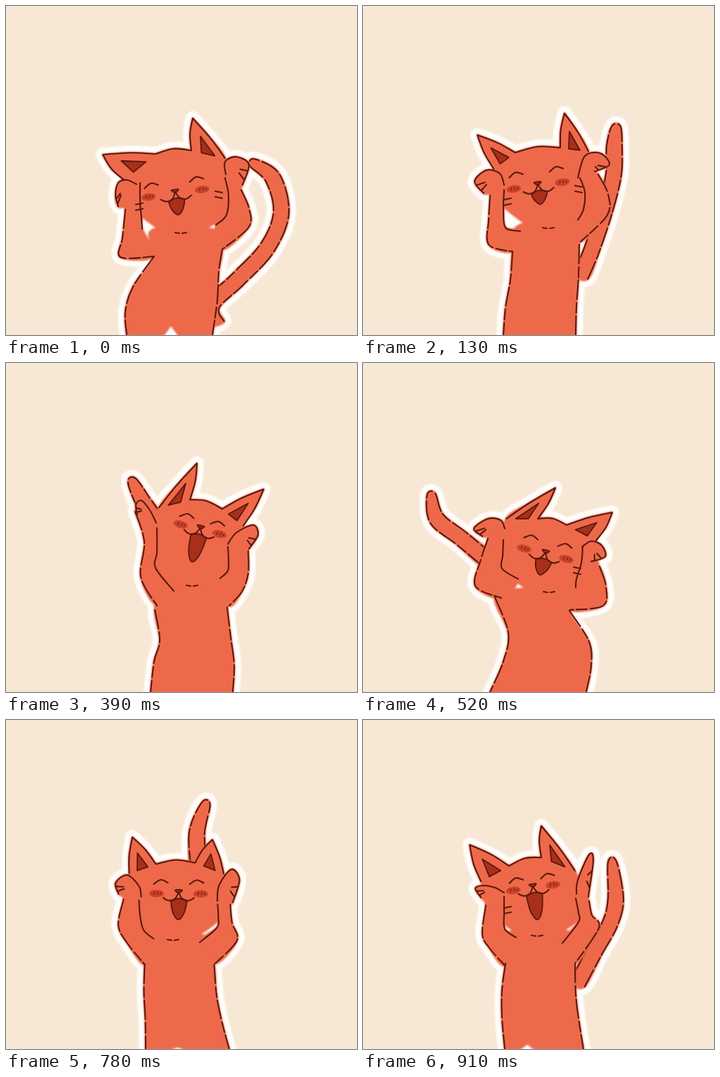
These frames come from a looping animation (500 px wide and 469 px high, 1.04 s). An HTML page:

```html
<!DOCTYPE html>
<html lang="en">
<head>
<meta charset="utf-8">
<title>Dancing cat</title>
<style>
html, body { margin: 0; width: 100%; height: 100%; overflow: hidden; background: #f7e8d5; }
svg { display: block; width: 100%; height: 100%; }
path { stroke-linecap: round; stroke-linejoin: round; }
.ink { fill: none; stroke: #581a10; stroke-width: 2.1; }
.fur { fill: #ee694a; stroke: #ee694a; stroke-width: 3; }
.rough { stroke-dasharray: 27 5 15 4; }
</style>
</head>
<body>
<svg viewBox="0 0 500 469">
  <defs>
    <filter id="soft" x="-5%" y="-5%" width="110%" height="110%"><feGaussianBlur stdDeviation="1.1"/></filter>
  </defs>
  <path id="halo" fill="#fffdfa" stroke="#fffdfa" stroke-width="20" filter="url(#soft)"/>
  <path id="tailFur" class="fur" filter="url(#soft)"/>
  <path id="tailInk" class="ink rough"/>
  <path id="fur" class="fur" filter="url(#soft)"/>
  <g id="cheeks" fill="#c9422a"></g>
  <path id="dark" fill="#a92f1a" stroke="#581a10" stroke-width="1.8"/>
  <path id="ink" class="ink"/>
  <path id="rough" class="ink rough"/>
</svg>
<script>
const STEP = 130;
const $ = id => document.getElementById(id);

// ear: base, tip, base. face: nose x, y, tilt, eye gap, eye rise, mouth depth.
// arm: inner edge, paw, outer edge. body: left and right edge, gap at the foot.
const sway = {
  ears: [[168,248, 138,212, 213,211], [264,206, 266,160, 312,217]],
  face: [241, 265, -8, 65, 15, 33],
  chin: [249, 324],
  armL: [[191,252, 191,280, 193,303, 194,318], [186,254, 172,248, 160,252, 156,270, 160,286], [170,290, 166,330, 163,358, 210,357]],
  armR: [[312,245, 317,270, 314,298, 299,312], [313,240, 312,222, 328,215, 346,226, 337,255], [335,262, 346,288, 346,315, 308,347]],
  body: [[211,357, 181,400, 170,435, 172,469], [308,347, 303,380, 301,420, 294,469], [235,454]],
  tail: [300,452, 294,425, 330,390, 372,345, 392,295, 380,245, 351,223],
  whiskers: [190,281, 303,266]
};
const reach = {
  ears: [[186,232, 163,184, 217,209], [281,202, 287,153, 321,207]],
  face: [249, 254, -8, 58, 19, 29],
  chin: [264, 317],
  armL: [[201,262, 200,290, 203,316, 224,321], [201,255, 195,239, 176,234, 159,250, 172,267], [181,270, 179,305, 179,340, 212,350]],
  armR: [[309,245, 316,265, 314,290, 306,305], [306,245, 316,214, 338,210, 351,226, 330,236], [335,240, 349,268, 348,298, 310,336]],
  body: [[213,350, 210,390, 203,430, 200,469], [308,340, 307,385, 304,430, 303,469], [255,469]],
  tail: [310,385, 325,350, 345,290, 357,240, 358,200, 361,171],
  whiskers: [206,274, 307,258]
};
const cheer = {
  ears: [[218,206, 272,143, 262,195], [308,208, 367,180, 338,232]],
  face: [277, 235, 14, 45, 13, 50],
  chin: [265, 318],
  armL: [[215,235, 215,270, 213,292, 239,325], [214,228, 205,210, 193,196, 185,202, 187,216], [184,212, 197,255, 192,305, 215,346]],
  armR: [[316,262, 317,280, 316,296, 305,307], [316,258, 328,242, 352,231, 359,245, 346,265], [345,268, 345,300, 336,326, 318,346]],
  body: [[212,352, 219,395, 211,425, 206,469], [315,348, 320,390, 325,430, 323,469], [255,469]],
  tail: [214,225, 196,199, 179,167],
  whiskers: []
};
const lean = {
  ears: [[204,222, 274,178, 249,222], [290,231, 355,213, 332,253]],
  face: [260, 270, 14, 50, 17, 33],
  chin: [265, 327],
  armL: [[200,252, 199,275, 198,293, 221,308], [202,236, 196,224, 178,222, 158,236, 170,247], [178,250, 168,280, 160,318, 197,335]],
  armR: [[313,262, 311,285, 304,308, 303,320], [312,262, 325,254, 340,260, 345,276, 325,283], [337,290, 346,318, 342,346, 295,352]],
  body: [[188,334, 207,385, 200,425, 181,469], [294,353, 322,397, 325,432, 318,469], [255,469]],
  tail: [182,285, 140,250, 105,222, 97,187],
  whiskers: [305,293]
};
const hop = {
  ears: [[183,207, 208,156, 219,203], [285,211, 334,190, 318,223]],
  face: [250, 254, 9, 57, 18, 30],
  chin: [228, 320],
  armL: [[178,262, 181,282, 190,301, 203,314], [184,258, 191,235, 173,206, 152,225, 153,243], [160,247, 150,280, 166,312, 194,348]],
  armR: [[300,272, 298,290, 294,304, 268,316], [298,268, 301,243, 320,234, 337,256, 325,268], [317,268, 318,300, 322,333, 292,349]],
  body: [[192,350, 195,390, 199,430, 196,469], [291,350, 297,395, 308,435, 322,469], [255,469]],
  tail: [184,210, 174,185, 175,150, 196,117],
  whiskers: [194,258, 295,270]
};
const laugh = {
  ears: [[168,230, 152,178, 208,208], [254,196, 254,151, 302,215]],
  face: [242, 237, -8, 45, 13, 48],
  chin: [248, 308],
  armL: [[201,252, 201,275, 202,298, 218,310], [201,246, 188,239, 172,236, 160,240, 168,253], [175,264, 170,305, 180,325, 202,350]],
  armR: [[303,254, 307,275, 307,288, 284,318], [304,248, 306,228, 322,192, 328,200, 321,252], [322,258, 326,278, 336,296, 303,346]],
  body: [[203,347, 198,385, 198,425, 202,469], [302,347, 303,390, 307,425, 314,469], [234,461]],
  tail: [306,375, 330,330, 352,290, 360,255, 355,202],
  whiskers: [206,266]
};

const mean = (a, b) => Array.isArray(a) ? a.map((v, i) => mean(v, b[i])) : (a + b) / 2;

function between(a, b, tail) {
  const pose = { tail, whiskers: [] };
  for (const key of ['ears', 'face', 'chin', 'armL', 'armR', 'body']) pose[key] = mean(a[key], b[key]);
  return pose;
}

const poses = [
  sway, reach, between(reach, cheer, [262,215, 262,150, 268,99]), cheer,
  lean, hop, between(hop, laugh, [275,215, 272,160, 285,119]), laugh
];

// Points are [x, y] or [x, y, 1] for a sharp corner
const pairs = flat => flat.flatMap((v, i) => i % 2 ? [] : [[v, flat[i + 1]]]);
const mix = (a, b, t) => [a[0] + (b[0] - a[0]) * t, a[1] + (b[1] - a[1]) * t];
const add = (p, x, y) => [p[0] + x, p[1] + y];
const sharp = p => [p[0], p[1], 1];

// Smooth curve through points
function curve(pts, closed) {
  const n = pts.length;
  const at = i => closed ? pts[(i + n) % n] : pts[Math.max(0, Math.min(n - 1, i))];
  const slope = i => at(i)[2] ? [0, 0] : mix(at(i - 1), at(i + 1), 1).map((v, k) => (v - at(i - 1)[k]) / 6);
  let d = `M${pts[0][0]} ${pts[0][1]}`;
  for (let i = 0; i < (closed ? n : n - 1); i++) {
    const p = at(i), q = at(i + 1), u = slope(i), v = slope(i + 1);
    d += `C${p[0] + u[0]} ${p[1] + u[1]} ${q[0] - v[0]} ${q[1] - v[1]} ${q[0]} ${q[1]}`;
  }
  return closed ? d + 'Z' : d;
}

// Closed shape with a fixed winding, so that overlaps stay filled
function blob(pts) {
  const area = pts.reduce((sum, p, i) => {
    const q = pts[(i + 1) % pts.length];
    return sum + p[0] * q[1] - q[0] * p[1];
  }, 0);
  return curve(area < 0 ? [...pts].reverse() : pts, true);
}

function ear(flat) {
  const [a, tip, b] = pairs(flat);
  const mid = mix(a, b, 0.5);
  const bulge = p => add(mix(p, tip, 0.5), (p[0] - mid[0]) * 0.12, (p[1] - mid[1]) * 0.12);
  const inner = [mix(mid, tip, 0.5), mix(mid, a, 0.4), mix(mid, b, 0.4)].map(sharp);
  return { a, b, edge: [a, bulge(a), sharp(tip), bulge(b), b], inner: curve(inner, true) };
}

function arm(parts) {
  const [inner, paw, outer] = parts.map(pairs);
  const mid = paw.reduce((m, p) => add(m, p[0] / paw.length, p[1] / paw.length), [0, 0]);
  const fingers = [0.3, 0.75].map(t => {
    const p = mix(paw[3], paw[4], t);
    return curve([p, mix(p, mid, 0.6)]);
  });
  return {
    fur: blob([...[...inner].reverse(), ...paw, ...outer]),
    ink: curve(inner) + curve(paw) + fingers.join(''),
    rough: curve(outer)
  };
}

function tailEdge(flat) {
  const pts = pairs(flat), last = pts.length - 1;
  const side = sign => pts.map((p, i) => {
    const a = pts[Math.max(0, i - 1)], b = pts[Math.min(last, i + 1)];
    const dx = b[0] - a[0], dy = b[1] - a[1];
    const w = sign * (i === last ? 6 : 11) / Math.hypot(dx, dy);
    return add(p, -dy * w, dx * w);
  });
  return [...side(1), ...side(-1).reverse()];
}

function face([x, y, tilt, gap, rise, depth]) {
  const r = tilt * Math.PI / 180, c = Math.cos(r), s = Math.sin(r);
  const at = (u, v) => [x + u * c - v * s, y + u * s + v * c];
  const eye = u => curve([at(u - 10, 4 - rise), at(u, -2 - rise), at(u + 10, 2 - rise)]);
  const lip = k => curve([at(22 * k, 8), at(14 * k, 12), at(5 * k, 9), at(0, 0)]);
  const cheek = k => {
    const [px, py] = at(k * (gap / 2 + 6), 2);
    return `<g transform="translate(${px} ${py}) rotate(${tilt})"><ellipse rx="10.5" ry="5.3"/>` +
      '<path d="M-4 1l1-3M1 1l1-3M5 1l1-2" stroke="#7d2113" stroke-width="1.4"/></g>';
  };
  const mouth = [sharp(at(-11, 13)), at(0, 9), sharp(at(12, 12)), at(8, depth * 0.75), at(0, depth), at(-8, depth * 0.75)];
  return {
    ink: eye(-gap / 2) + eye(gap / 2) + lip(-1) + lip(1),
    dark: curve(mouth, true) + curve([at(-5, -3), at(0, 1), at(5, -3)], true),
    cheeks: cheek(-1) + cheek(1)
  };
}

function build(p) {
  const [left, right] = p.ears.map(ear);
  const arms = [arm(p.armL), arm(p.armR)];
  const look = face(p.face);
  const { chin } = p;
  const top = add(mix(left.b, right.a, 0.5), 0, -5);
  const jawL = add(chin, -60, -28), jawR = add(chin, 64, -28);
  const head = blob([
    ...left.edge.slice(0, 4), sharp(left.b), top, sharp(right.a), ...right.edge.slice(1),
    add(mix(right.b, jawR, 0.5), 3, 0), jawR, add(chin, 0, 5), jawL, add(mix(left.a, jawL, 0.5), -3, 0)
  ]);

  const [sideL, sideR] = p.body.slice(0, 2).map(pairs);
  const foot = p.body[2];
  const notch = [[foot[0] - 11, 469], foot, [foot[0] + 11, 469]].map(sharp);
  const body = blob([
    add(chin, -40, -5), ...sideL.slice(0, 3), sharp(sideL[3]), ...notch,
    sharp(sideR[3]), ...sideR.slice(0, 3).reverse(), add(chin, 48, -5)
  ]);

  const whiskers = pairs(p.whiskers).map(([x, y]) => {
    const k = x < p.face[0] ? -1 : 1;
    return [0, 8].map(d => curve([[x - 5, y + d - 2 * k], [x + 5, y + d]])).join('');
  });
  const chinInk = curve([add(chin, -8, -1), add(chin, -2, 0)]) + curve([add(chin, 2, 0), add(chin, 8, -1)]);
  const edge = tailEdge(p.tail);
  const fur = head + body + arms[0].fur + arms[1].fur;
  const tailFur = blob(edge);
  return {
    halo: fur + tailFur, tailFur, fur,
    tailInk: curve(edge),
    dark: left.inner + right.inner + look.dark,
    ink: curve(left.edge) + curve(right.edge) + curve([left.b, top, right.a]) +
      look.ink + chinInk + whiskers.join('') + arms[0].ink + arms[1].ink,
    rough: curve(sideL) + curve(sideR) + arms[0].rough + arms[1].rough,
    cheeks: look.cheeks
  };
}

const drawn = poses.map(build);
let shown = -1;
function show(i) {
  if (i === shown) return;
  shown = i;
  const { cheeks, ...paths } = drawn[i];
  for (const id in paths) $(id).setAttribute('d', paths[id]);
  $('cheeks').innerHTML = cheeks;
}

const start = performance.now();
function tick() {
  show(Math.floor((performance.now() - start) / STEP) % poses.length);
  requestAnimationFrame(tick);
}
tick();
</script>
</body>
</html>
```
